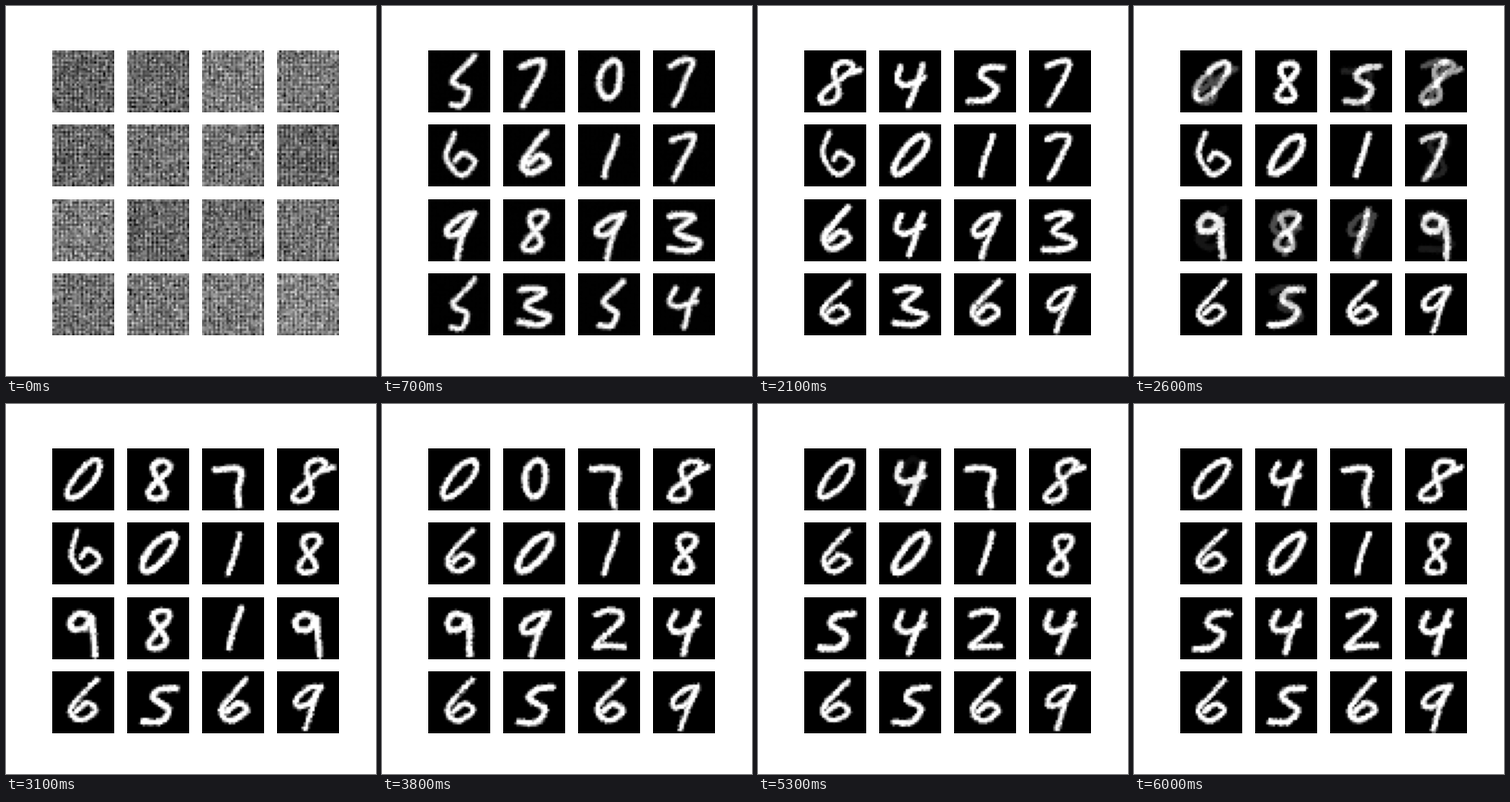
Write a matplotlib script that moves like this. It is 400x400 px and loops after 6.2 s.

```python
import numpy as np
import matplotlib.pyplot as plt
from matplotlib.animation import FuncAnimation

FRAMES, INTERVAL = 62, 100
SIZE = 28          # pixels along one side of a generated digit
SAMPLES = 72       # points per stroke after smoothing

gy, gx = np.mgrid[:SIZE, :SIZE] + .5


def curve(*flat):
    """Catmull-Rom curve through x, y pairs."""
    p = np.reshape(flat, (-1, 2)).astype(float)
    q = np.vstack([p[:1], p, p[-1:]])
    t = np.linspace(0, len(p) - 1, SAMPLES)
    i = np.minimum(t.astype(int), len(p) - 2)
    u = (t - i)[:, None]
    a, b, c, d = (q[i + k] for k in range(4))
    return b + u / 2 * (c - a + u * (2 * a - 5 * b + 4 * c - d
                                     + u * (3 * (b - c) + d - a)))


def loop(cx, cy, rx, ry, slant, turns=1):
    """Sheared oval, or a figure eight with two turns across."""
    a = np.linspace(0, 2 * np.pi, SAMPLES)
    dy = -ry * np.cos(a)
    return np.column_stack([cx + rx * np.sin(turns * a) - slant * dy, cy + dy])


# Letters are handwriting variants: o upright 0, S pointed 5, b left-hand 6,
# T square 7, & slanted 8 with a tail, q 9 with a straight stem.
GLYPHS = {
    "0": [loop(14.3, 13.8, 4.8, 8.6, .65)],
    "o": [loop(14.6, 13.5, 4.6, 8.3, .15)],
    "1": [curve(17.3, 5, 12, 23)],
    "2": [curve(8, 8, 14, 6, 19, 7, 18, 12, 8, 22, 13, 22, 21, 22)],
    "3": [curve(8, 8, 13, 6.5, 18.5, 8, 11, 14.5, 20.5, 19, 17, 22.5, 7, 22.5)],
    "4": [curve(10, 7, 8, 13, 12, 15.5, 20, 12.5), curve(20, 7, 17, 15, 13.5, 25)],
    "5": [curve(22, 7.5, 15, 8, 12, 12, 19, 17, 15, 22.5, 7, 23)],
    "S": [curve(20.5, 3, 12, 12, 13, 15, 18, 18, 15, 24, 10, 24)],
    "6": [curve(20, 4, 9.5, 15, 9.5, 20, 14, 22, 20, 18, 16, 14.5, 11, 18)],
    "b": [curve(11.5, 4, 8.5, 14.5, 14.5, 22.5, 21.5, 17, 16, 12.5, 13, 16)],
    "7": [curve(8, 7, 13, 5, 18, 6, 13, 18, 9, 24.5)],
    "T": [curve(6, 9.5, 17.5, 10, 16, 20, 16.5, 26)],
    "8": [loop(14.5, 14.5, 3.8, 8.5, .15, 2)],
    "&": [loop(14.5, 14.5, 4, 9, .45, 2), curve(19, 11, 25, 8.5)],
    "9": [curve(20, 7, 14, 8, 9, 12.5, 10, 16, 15.5, 14, 20, 7, 17, 14, 12.5, 26)],
    "q": [curve(18, 9.5, 12, 7.5, 8.5, 11, 10, 14.5, 15, 14, 18, 10, 19, 26)],
}

# What the sixteen cells show, row by row, once an epoch is reached.
GRIDS = {
    14: "S7o7 b617 9893 S3S4",
    21: "&457 b017 6493 6369",
    31: "08T& b018 q81q 6569",
    38: "0oT& 6018 q924 6569",
    47: "0oT& 6018 5424 6569",
    60: "04T& 6018 5424 6569",
}
labels = {epoch: text.replace(" ", "") for epoch, text in GRIDS.items()}
epochs = list(labels)

setup = np.random.default_rng(3)
brightness = setup.uniform(.38, .52, 16)
widths = setup.uniform(1.2, 1.55, 16)
delays = setup.uniform(-.25, .25, 16)


def noise(cell, rng):
    """Untrained output: speckle with the two-pixel upsampling lattice."""
    lattice = .08 * np.cos(np.pi * (gx - .5)) + .05 * np.cos(np.pi * (gy - .5))
    return brightness[cell] + lattice + rng.normal(0, .12, (SIZE, SIZE))


def ink(label, width, n, phase, rough):
    """Draw a glyph, blurred and warped less as training goes on."""
    p = np.vstack(GLYPHS[label])
    warp = .3 + 1.5 * np.exp(-n / 4)
    x = p[:, 0] + warp * np.sin(.3 * p[:, 1] + phase[0])
    y = p[:, 1] + warp * np.sin(.3 * p[:, 0] + phase[1])
    dist = np.sqrt(((gx[..., None] - x) ** 2 + (gy[..., None] - y) ** 2).min(-1))
    soft = 1 + 5 * np.exp(-n / 2.5)
    return np.clip((width + soft / 2 - dist + rough) / soft, 0, 1)


def render(cell, n):
    rng = np.random.default_rng(100 * n + cell)
    raw = noise(cell, rng)
    if n == 0:
        return np.clip(raw, 0, 1)
    phase = rng.uniform(0, 2 * np.pi, 2)
    rough = rng.normal(0, .18, (SIZE, SIZE))
    end = next(e for e in epochs if e >= n)
    start = max((e for e in epochs if e < n), default=end)
    old, new = labels[start][cell], labels[end][cell]
    picture = ink(new, widths[cell], n, phase, rough)
    if old != new:
        u = (n - start) / (end - start)
        s = np.clip(.5 + 2.5 * (u - .5 + delays[cell]), 0, 1)
        picture = s * picture + (1 - s) * ink(old, widths[cell], n, phase, rough)
    mix = np.exp(-n / 1.5)
    return np.clip(picture * (1 - mix) + raw * mix, 0, 1)


fig, axes = plt.subplots(4, 4, figsize=(4, 4), dpi=100)
images = []
for ax in axes.flat:
    images.append(ax.imshow(np.zeros((SIZE, SIZE)), cmap="gray", vmin=0, vmax=1))
    ax.axis("off")


def update(i):
    n = min(i, epochs[-1])
    for cell, image in enumerate(images):
        image.set_data(render(cell, n))
    return images


anim = FuncAnimation(fig, update, frames=FRAMES, interval=INTERVAL,
                     repeat=True, repeat_delay=0)
plt.show()
```
